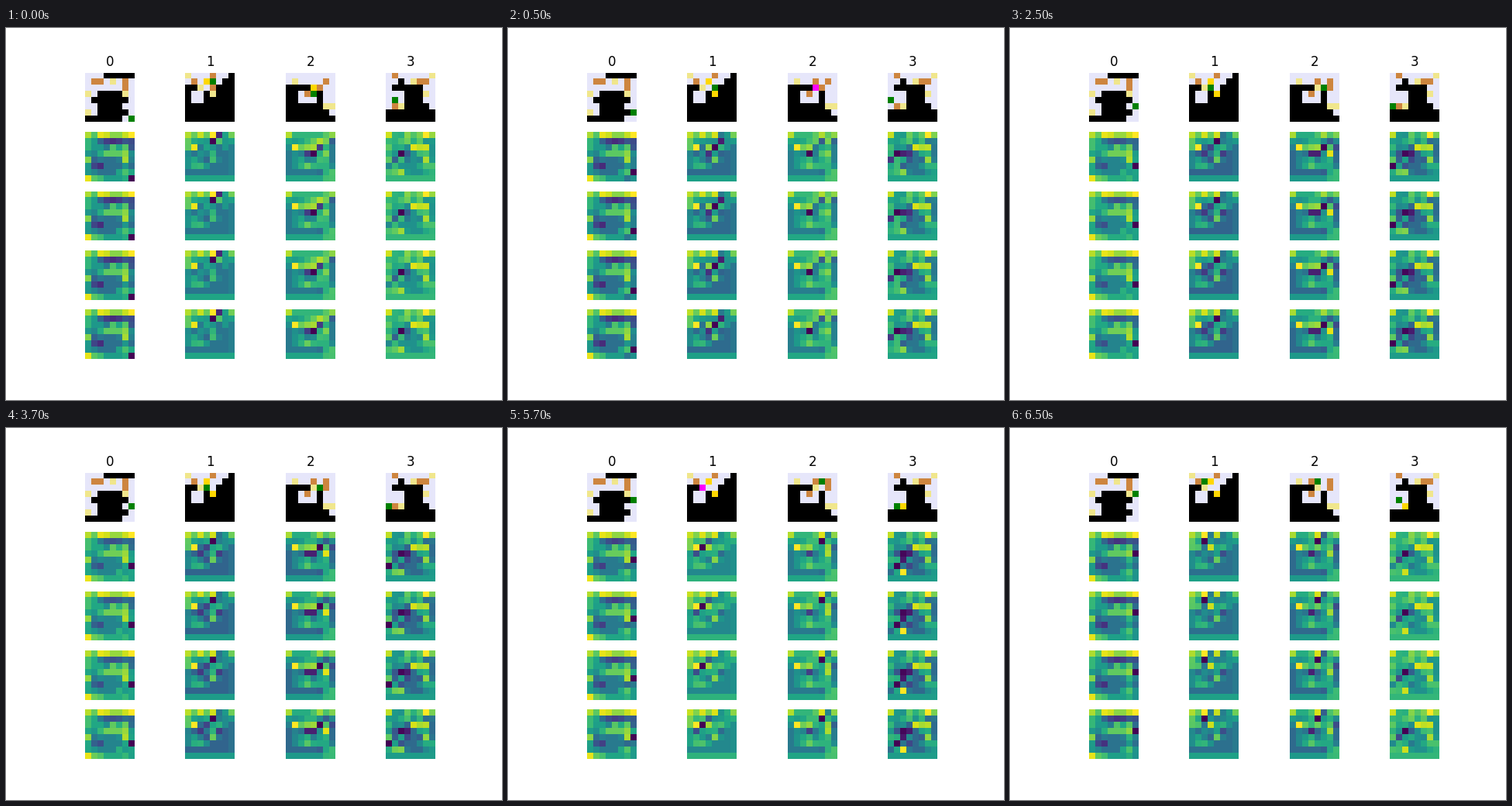
Recreate the animation shown at these times as a matplotlib script. Size 640 by 480 pixels, loop 8 s.

```python
import numpy as np
import matplotlib.pyplot as plt
from matplotlib.animation import FuncAnimation
from matplotlib.colors import to_rgb

SIZE = 8
INTERVAL = 500
FRAMES = 16
STEP = {"U": (0, -1), "D": (0, 1), "L": (-1, 0), "R": (1, 0)}

# Walls are (x, y, width, height); everything else is (x, y).
LEVELS = [
    dict(walls=[(3, 0, 5, 1), (2, 3, 4, 4), (1, 4, 6, 1), (6, 6, 1, 1), (0, 7, 6, 1)],
         targets=[(4, 1), (0, 3), (6, 3), (0, 6)],
         boxes=[(1, 1), (2, 1), (6, 1), (6, 2)],
         agent=(7, 7), path="UUUU"),
    dict(walls=[(7, 0, 1, 8), (6, 1, 1, 7), (5, 2, 1, 6), (0, 2, 2, 1), (0, 3, 1, 5),
                (3, 3, 1, 2), (4, 4, 1, 1), (0, 5, 8, 3)],
         targets=[(0, 0), (3, 1), (2, 2), (4, 3)],
         boxes=[(4, 0), (1, 1), (3, 1), (4, 2)],
         agent=(4, 1), path="DLLU"),
    dict(walls=[(0, 2, 4, 1), (0, 3, 2, 5), (5, 3, 1, 5), (0, 5, 6, 3), (0, 6, 7, 2),
                (0, 7, 8, 1)],
         targets=[(1, 1), (4, 2), (6, 5), (7, 5)],
         boxes=[(4, 2), (5, 2), (6, 1), (3, 3)],
         agent=(4, 3), path="URUL"),
    dict(walls=[(2, 1, 1, 1), (1, 2, 5, 1), (3, 3, 3, 3), (3, 5, 4, 1), (0, 6, 8, 2)],
         targets=[(7, 0), (4, 1), (6, 3), (2, 5)],
         boxes=[(1, 0), (5, 1), (6, 1), (1, 5)],
         agent=(1, 4), path="LDRU"),
]

# How a neighbour in each direction shifts a cell's value ("" is the cell itself).
INFLUENCE = {
    "open": {"": -0.07, "U": 0.17, "UL": 0.17, "UR": 0.15, "L": -0.17,
             "DL": -0.14, "DR": 0.12},
    "target": {"": -0.05, "U": 0.2, "UL": -0.1, "UR": -0.2},
    "box": {"U": 0.1, "L": -0.15, "D": 0.12, "DL": 0.3},
    "agent": {"": -0.65, "UL": 0.12, "UR": -0.3, "DL": -0.4, "D": 0.1},
}
TOP, BOTTOM, RIGHT = 0.6, 0.24, 0.05


def mask(cells):
    grid = np.zeros((SIZE, SIZE))
    for x, y in cells:
        grid[y, x] = 1
    return grid


def open_mask(level):
    grid = np.ones((SIZE, SIZE))
    for x, y, w, h in level["walls"]:
        grid[y:y + h, x:x + w] = 0
    return grid


def play(level, steps):
    """Return the agent and the boxes after the given number of moves."""
    (x, y), boxes = level["agent"], set(level["boxes"])
    for move in level["path"][:steps]:
        dx, dy = STEP[move]
        x, y = x + dx, y + dy
        if (x, y) in boxes:
            boxes.remove((x, y))
            boxes.add((x + dx, y + dy))
    return (x, y), boxes


def board_image(level, agent, boxes):
    image = np.zeros((SIZE, SIZE, 3))
    image[open_mask(level) > 0] = to_rgb("lavender")
    targets = set(level["targets"])
    for x, y in targets | boxes:
        on_both = (x, y) in targets and (x, y) in boxes
        color = "gold" if on_both else "khaki" if (x, y) in targets else "peru"
        image[y, x] = to_rgb(color)
    image[agent[1], agent[0]] = to_rgb("magenta" if agent in targets else "green")
    return image


def spread(grid, weights):
    """Sum the neighbours of every cell, weighted by direction."""
    padded = np.pad(grid, 1)
    total = np.zeros_like(grid)
    for direction, weight in weights.items():
        x = 1 + sum(STEP[d][0] for d in direction)
        y = 1 + sum(STEP[d][1] for d in direction)
        total += weight * padded[y:y + SIZE, x:x + SIZE]
    return total


def value_map(level, agent, boxes):
    layers = {"open": open_mask(level), "target": mask(level["targets"]),
              "box": mask(boxes), "agent": mask([agent])}
    heat = sum(spread(grid, INFLUENCE[kind]) for kind, grid in layers.items())
    heat[0] += TOP
    heat[-1] += BOTTOM
    heat[:-1, -1] += RIGHT
    return heat


fig, axes = plt.subplots(5, 4, figsize=(6.4, 4.8), dpi=100)
boards, heats = [], []
for index, level in enumerate(LEVELS):
    state = play(level, 0)
    axes[0, index].set_title(str(index))
    boards.append(axes[0, index].imshow(board_image(level, *state)))
    heats.append([ax.imshow(value_map(level, *state), cmap="viridis")
                  for ax in axes[1:, index]])
for ax in axes.flat:
    ax.axis("off")


def update(frame):
    steps = (frame + 3) // 4
    for level, board, column in zip(LEVELS, boards, heats):
        state = play(level, steps)
        board.set_data(board_image(level, *state))
        heat = value_map(level, *state)
        for image in column:
            image.set_data(heat)
            image.set_clim(heat.min(), heat.max())
    return boards + [image for column in heats for image in column]


anim = FuncAnimation(fig, update, frames=FRAMES, interval=INTERVAL,
                     repeat=True, repeat_delay=0, blit=False)
plt.show()
```
